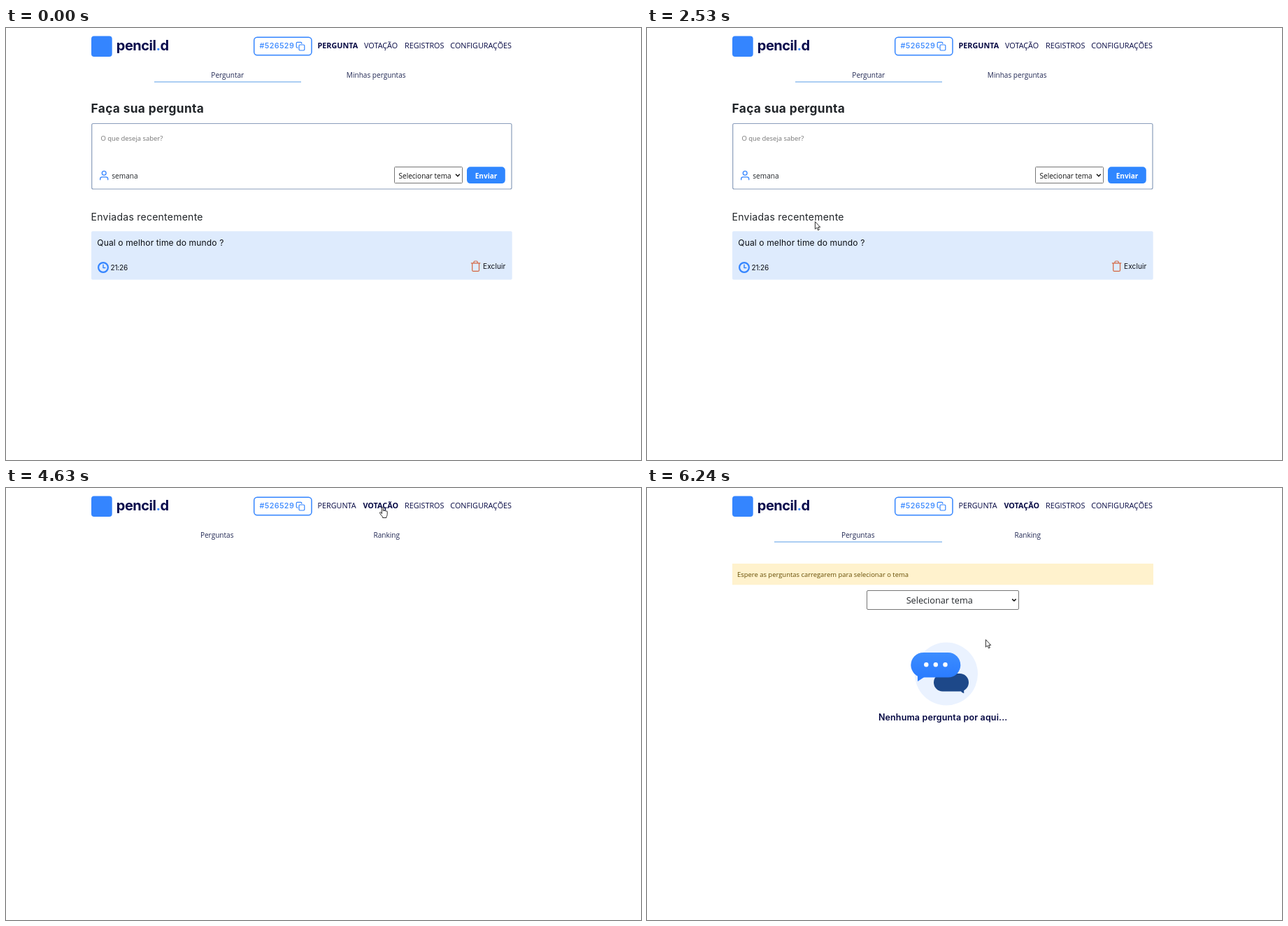
An HTML page for the animation above (8 s loop, 908 by 617 pixels).

```html
<!DOCTYPE html>
<html lang="pt-BR">
<head>
<meta charset="utf-8">
<title>Perguntas</title>
<style>
  html, body { margin: 0; width: 100%; height: 100%; overflow: hidden; background: #fff; }
  svg { display: block; width: 908px; height: 617px; }
  text { font-family: "Open Sans", "Noto Sans", sans-serif; font-size: 10.08px; fill: #212529; white-space: pre; }
  .round { font-family: Inter, Roboto, sans-serif; font-optical-sizing: none; }
  .nav text { font-size: 10.8px; fill: #050843; }
  .nav .bold, .bold { font-weight: 700; }
  .tab { fill: #232a55; }
  .card { fill: #0c0f14; }
  .mid { text-anchor: middle; }
  .line { fill: none; stroke: #3485ff; stroke-linecap: round; stroke-linejoin: round; }
  .chev { fill: none; stroke: #111; stroke-width: 1.5; }
  .brand { font-size: 20px; font-weight: 700; letter-spacing: -.5px; fill: #07094c; }
</style>
</head>
<body>
<svg viewBox="0 0 908 617" xmlns="http://www.w3.org/2000/svg">
  <defs>
    <linearGradient id="blue" x1="0" y1="0" x2="0" y2="1">
      <stop offset="0" stop-color="#3d8dff"/>
      <stop offset="1" stop-color="#2a7cff"/>
    </linearGradient>
  </defs>

  <rect x="122" y="11.5" width="29.7" height="29.5" rx="4" fill="#3485ff"/>
  <text class="round brand" x="157.8" y="31.5">pencil<tspan fill="#3485ff">.</tspan>d</text>

  <g class="nav">
    <g id="chip">
      <rect class="line" x="354.7" y="13.3" width="82.3" height="25.5" rx="4.5" stroke-width="1.5"/>
      <text class="round" x="362.5" y="29.4" style="fill:#3485ff;font-weight:500;letter-spacing:.4px">#526529</text>
      <g class="line" stroke-width="1.2">
        <rect x="419" y="24" width="7.8" height="8" rx="1.4"/>
        <path d="M417 28.2h-.6q-1.2 0-1.2-1.2v-5.2q0-1.4 1.4-1.4h5q1.2 0 1.2 1.2v.6"/>
      </g>
    </g>
    <text id="ask" class="bold" x="445.4" y="29.3">PERGUNTA</text>
    <text id="vote" x="512" y="29.3">VOTAÇÃO</text>
    <text x="570" y="29.3">REGISTROS</text>
    <text x="635.3" y="29.3">CONFIGURAÇÕES</text>
  </g>

  <g id="askPage">
    <text class="tab mid" x="316.8" y="71.4">Perguntar</text>
    <text class="tab mid" x="529.2" y="71.4">Minhas perguntas</text>
    <rect x="212" y="76.5" width="210" height="1" fill="#5b9de8"/>

    <text class="round bold" x="121.6" y="120.7" style="font-size:17.3px;letter-spacing:.35px">Faça sua pergunta</text>
    <rect x="122.7" y="136.5" width="600.3" height="93.5" rx="2" fill="#fff" stroke="#8a9dbb" stroke-width="1.2"/>
    <text x="135.4" y="160.9" style="font-size:9.45px;fill:#757575">O que deseja saber?</text>
    <g class="line" stroke-width="1.3">
      <circle cx="140.2" cy="207.3" r="2.9"/>
      <path d="M134.7 216.7v-1.2q0-2.6 2.7-2.6h5.6q2.7 0 2.7 2.6v1.2"/>
    </g>
    <text x="151.3" y="214.5">semana</text>
    <rect x="555.5" y="198.5" width="97" height="23" rx="1" fill="#fff" stroke="#767676"/>
    <text x="561.6" y="214.5" style="font-size:10px;fill:#111">Selecionar tema</text>
    <path class="chev" d="M643 208.8l2.9 2.9l2.9-2.9"/>
    <rect x="659" y="198.3" width="54.8" height="23.8" rx="5" fill="#2f86ff"/>
    <text class="bold mid" x="686.5" y="214.5" style="fill:#fff">Enviar</text>

    <text class="round" x="121.6" y="275.3" style="font-size:14px;letter-spacing:.25px">Enviadas recentemente</text>
    <rect x="122" y="290.3" width="601.7" height="69.2" rx="2" fill="#deebfd"/>
    <text class="round card" x="130.3" y="311" style="font-size:12.1px;letter-spacing:.1px">Qual o melhor time do mundo ?</text>
    <g class="line">
      <circle cx="139" cy="342" r="6.9" stroke-width="2.2"/>
      <path d="M139 338.2v4.2h2.8" stroke-width="1.5"/>
    </g>
    <text class="round card" x="149.6" y="346" style="letter-spacing:-.25px">21:26</text>
    <g class="line" stroke-width="1.2" style="stroke:#d4653f">
      <path d="M665.3 335.8h12.6M669 335.5v-1.3q0-1.2 1.2-1.2h2.8q1.2 0 1.2 1.2v1.3M666.7 336v9.900q0 1.500 1.500 1.500h6.800q1.500 0 1.500-1.500v-9.900"/>
    </g>
    <text class="round card" x="682" y="344" style="letter-spacing:.1px">Excluir</text>
  </g>

  <g id="votePage">
    <text class="tab mid" x="301.7" y="71.4">Perguntas</text>
    <text class="tab mid" x="544.2" y="71.4">Ranking</text>
    <g id="voteBody">
      <rect x="182" y="76.5" width="240" height="1" fill="#5b9de8"/>
      <rect x="122" y="108" width="602" height="30.3" fill="#fff2cd"/>
      <text x="129" y="127" style="font-size:9.44px;fill:#664d03">Espere as perguntas carregarem para selecionar o tema</text>
      <rect id="theme" x="314.5" y="146.5" width="217" height="27" rx="1.5"/>
      <text class="mid" x="418.2" y="165.4" style="font-size:12.7px">Selecionar tema</text>
      <path class="chev" d="M522.2 158.6l2.7 2.7l2.7-2.7"/>

      <circle cx="428" cy="265.5" r="45" fill="#eaf2ff"/>
      <path d="M446 288h7.200v5.300q-3.200-1-5.200-3.800z" fill="#1d4889"/>
      <rect x="410" y="265" width="50" height="25.500" rx="12.700" fill="#1d4889"/>
      <path d="M387 262v14.200l9.500-6.200z" fill="#2a7cff"/>
      <rect x="377.3" y="235" width="71" height="35.6" rx="17.8" fill="url(#blue)"/>
      <g fill="#fff">
        <circle cx="399.3" cy="252.3" r="3.2"/>
        <circle cx="412.8" cy="252.3" r="3.2"/>
        <circle cx="426.5" cy="252.3" r="3.2"/>
      </g>
      <text class="round mid" x="423.2" y="332" style="font-size:12.5px;font-weight:600;letter-spacing:.14px;fill:#050843">Nenhuma pergunta por aqui...</text>
    </g>
  </g>

  <g id="cursor" fill="#fff" stroke="#1a1a1a" stroke-width=".9" stroke-linejoin="round">
    <path id="arrow" d="M.4.6v10.6l2.4-2.2l1.7 3.8l1.8-.8l-1.7-3.6h3.1z"/>
    <path id="hand" d="M3.4 9.6V1.7q0-1.2 1-1.2t1 1.2v4q.2-.7 1-.7t1 .9q.3-.6 1-.6t.9 1q.3-.5.9-.5q1 0 1 1.200v3.400q0 2.200-1.300 3.600v1.500H4.600v-1.300Q2.500 12.300.6 8.900q-.4-1 .3-1.400t1.400.4z"/>
  </g>
</svg>

<script>
const LOOP = 8000;
const ENTER = 670, HOVER = 3560, CLICK = 4630, READY = 4760, LEAVE = 4885, LOADED = 4960;
const STEP = 68.9;

// time, x, y of the pointer tip
const path = [
  [670, 847, 601], [810, 560, 370], [950, 250, 190], [1020, 120, 158], [1090, 56, 165],
  [1230, 80, 200], [1440, 131, 215], [1640, 190, 194], [1780, 234, 212], [1920, 215, 238],
  [2045, 184, 233], [2180, 165, 228], [2260, 153, 238], [2400, 175, 290], [2470, 200, 295],
  [2680, 340, 230], [2900, 510, 110], [3010, 538, 82], [3070, 532, 74], [3160, 532, 70],
  [3320, 534, 53], [3480, 535, 36], [3600, 535, 30], [3700, 534, 26.5], [4760, 534, 26.5],
  [4890, 531, 48], [5100, 512, 130], [5300, 492, 210], [5420, 484, 226], [5485, 485, 221],
  [5555, 484, 216]
];

const el = id => document.getElementById(id);
const show = (id, on) => { el(id).style.display = on ? "" : "none"; };

function pointAt(t) {
  const last = path[path.length - 1];
  if (t >= last[0]) return [last[1], last[2]];
  const i = Math.max(1, path.findIndex(p => p[0] > t));
  const [t0, x0, y0] = path[i - 1], [t1, x1, y1] = path[i];
  const k = (t - t0) / (t1 - t0);
  return [x0 + (x1 - x0) * k, y0 + (y1 - y0) * k];
}

function draw(t) {
  const clicked = t >= CLICK;
  const hover = t >= HOVER && !clicked;
  const loaded = t >= LOADED;

  show("askPage", !clicked);
  show("votePage", clicked);
  show("voteBody", t >= READY);

  el("chip").setAttribute("transform", `translate(${hover ? -2 : 0} 0)`);
  el("ask").setAttribute("x", hover ? 443.5 : 445.5);
  el("ask").setAttribute("class", clicked ? "" : "bold");
  el("vote").setAttribute("x", t >= HOVER ? 510.4 : 512);
  el("vote").setAttribute("class", t >= HOVER ? "bold" : "");
  el("theme").setAttribute("fill", loaded ? "#fff" : "#f8f9f9");
  el("theme").setAttribute("stroke", loaded ? "#767676" : "#cfd2d4");

  const hand = t >= HOVER && t < LEAVE;
  show("cursor", t >= ENTER);
  show("hand", hand);
  show("arrow", !hand);
  const tick = ENTER + Math.floor((t - ENTER) / STEP + .05) * STEP;
  const [x, y] = pointAt(Math.max(ENTER, tick)).map(Math.round);
  el("cursor").setAttribute("transform", `translate(${x} ${y})`);
}

const start = performance.now();
function frame() {
  draw((performance.now() - start) % LOOP);
  requestAnimationFrame(frame);
}
draw(0);
requestAnimationFrame(frame);
</script>
</body>
</html>
```
